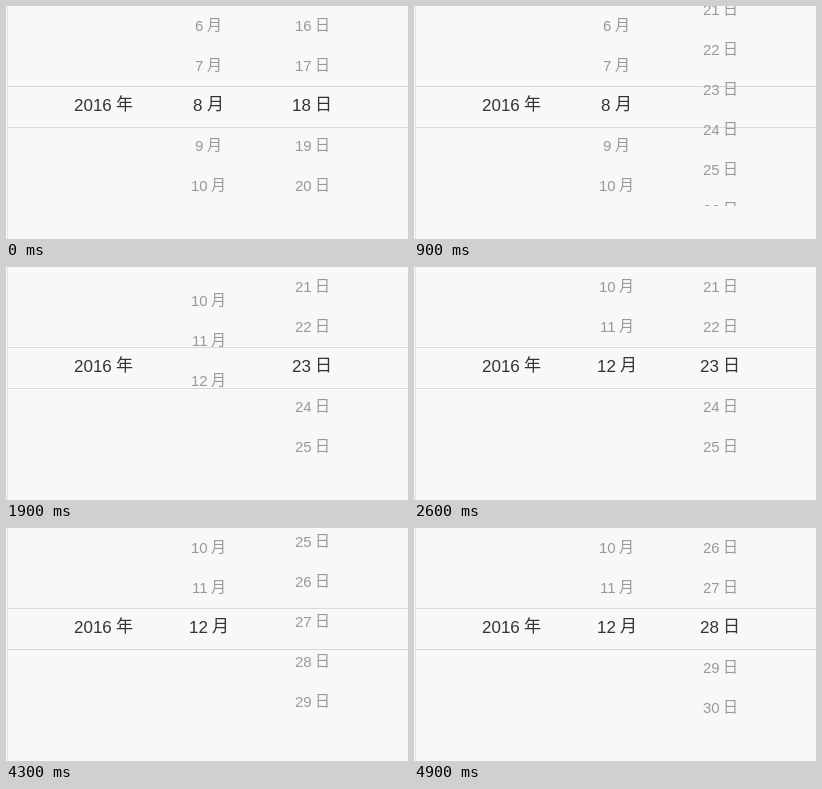
An HTML page with a canvas that plays this animation: 402x233 px, repeating every 5.4 s.

```html
<!DOCTYPE html>
<html lang="zh">
<head>
<meta charset="utf-8">
<title>Date picker</title>
<style>
  html, body { margin: 0; width: 100%; height: 100%; overflow: hidden; background: #f8f8f8; }
  canvas { display: block; }
</style>
</head>
<body>
<canvas id="stage" width="402" height="233"></canvas>
<script>
const ctx = document.getElementById('stage').getContext('2d');
const LOOP = 5400, STEP = 100;
const ROW = 40, CENTER = 99, CLIP = 200;
const DIGIT_FONT = '"Liberation Sans", Arial, sans-serif';
const UNIT_FONT = '"Noto Sans CJK SC", "Noto Sans CJK", sans-serif';

// moves: start ms, end ms, target value, ease-out power
// picks: time from which a value is the highlighted one
const columns = [
  { x: 97.7, unit: '年', min: 2016, max: 2016, start: 2016, moves: [], picks: [[0, 2016]] },
  { x: 202.5, unit: '月', min: 1, max: 12, start: 8,
    moves: [[1600, 2000, 12 + 1 / ROW, 1.7], [2100, 2400, 12, 2]],
    picks: [[0, 8], [2600, 12]] },
  { x: 306, unit: '日', min: 1, max: 31, start: 18,
    moves: [[300, 900, 23 + 16 / ROW, 1.7], [900, 1300, 23, 2],
            [3900, 4600, 28 + 9 / ROW, 1.86], [4600, 4800, 28, 2]],
    picks: [[0, 18], [1400, 23], [4900, 28]] }
];

function positionAt(column, t) {
  let value = column.start;
  for (const [begin, end, target, power] of column.moves) {
    if (t <= begin) break;
    const p = Math.min(1, (t - begin) / (end - begin));
    value += (target - value) * (1 - (1 - p) ** power);
  }
  return value;
}

// Number and unit are centred together, each starting on a whole pixel.
function drawLabel(value, unit, x, y, active) {
  const size = active ? 17 : 15;
  ctx.fillStyle = active ? '#333' : '#999';
  ctx.font = `${size}px ${DIGIT_FONT}`;
  const width = ctx.measureText(`${value} `).width;
  const left = Math.ceil(x - (width + size) / 2);
  ctx.fillText(value, left, y);
  ctx.font = `300 ${size}px ${UNIT_FONT}`;
  ctx.fillText(unit, Math.floor(left + width), y - 1);
}

function drawColumn(column, t) {
  const position = positionAt(column, t);
  const picked = column.picks.filter(([time]) => time <= t).pop()[1];
  const first = Math.max(column.min, Math.floor(position) - 3);
  const last = Math.min(column.max, Math.ceil(position) + 3);
  for (let value = first; value <= last; value++) {
    const y = Math.round(CENTER + (value - position) * ROW + 6);
    drawLabel(value, column.unit, column.x, y, value === picked);
  }
}

function draw(t) {
  ctx.fillStyle = '#f8f8f8';
  ctx.fillRect(0, 0, 402, 233);
  ctx.fillStyle = '#e4e4e8';
  ctx.fillRect(1, 0, 1, 233);
  ctx.fillStyle = '#d5dae6';
  ctx.fillRect(2, 80, 400, 1);
  ctx.fillRect(2, 121, 400, 1);

  ctx.save();
  ctx.beginPath();
  ctx.rect(0, 0, 402, CLIP);
  ctx.clip();
  columns.forEach(column => drawColumn(column, t));
  ctx.restore();
}

const origin = performance.now();
function tick() {
  const t = (performance.now() - origin) % LOOP;
  draw(Math.floor(t / STEP) * STEP);
  requestAnimationFrame(tick);
}
tick();
</script>
</body>
</html>
```
